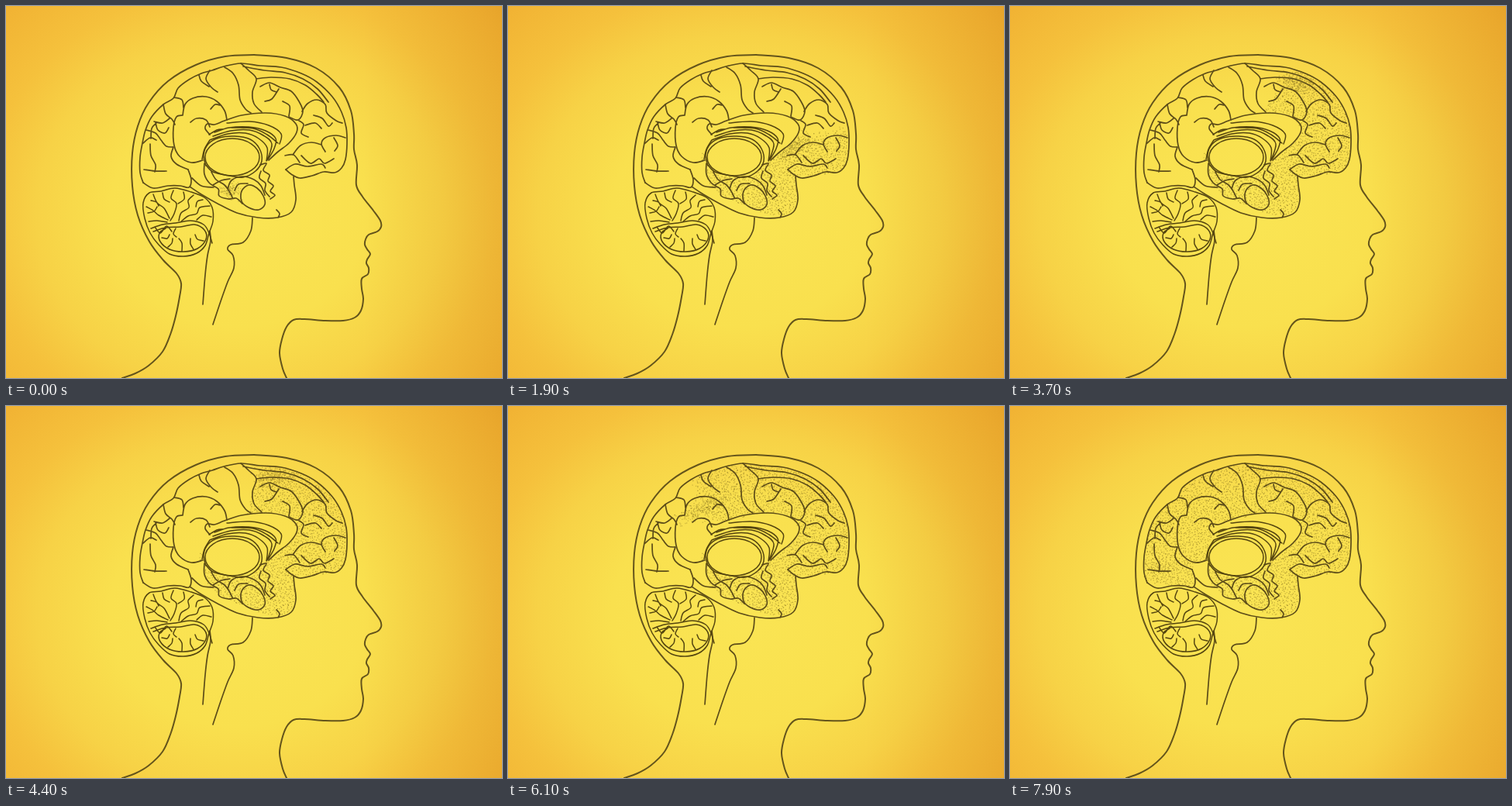
These frames come from a looping animation (640 by 480 pixels, 8000 ms). An HTML page with a canvas:

```html
<!DOCTYPE html>
<html lang="en">
<head>
<meta charset="utf-8">
<title>Brain</title>
<style>
html, body { margin: 0; width: 100%; height: 100%; overflow: hidden; background: #f5c43d; }
canvas { display: block; width: 640px; height: 480px; }
</style>
</head>
<body>
<canvas id="stage" width="640" height="480"></canvas>
<script>
const W = 640, H = 480, LOOP = 8000, STEP = 100;
const ctx = document.getElementById('stage').getContext('2d');

function randomFrom(seed) {
  return () => {
    seed = (seed + 0x6D2B79F5) | 0;
    let v = Math.imul(seed ^ (seed >>> 15), 1 | seed);
    v = (v + Math.imul(v ^ (v >>> 7), 61 | v)) ^ v;
    return ((v ^ (v >>> 14)) >>> 0) / 4294967296;
  };
}

// Smooth curve through the points of "x y x y ..."
function curve(text, closed = false, path = new Path2D()) {
  const n = text.trim().split(/\s+/).map(Number);
  const pts = [];
  for (let i = 0; i < n.length; i += 2) pts.push([n[i], n[i + 1]]);
  const count = pts.length;
  const at = i => closed ? pts[(i + count) % count] : pts[Math.max(0, Math.min(count - 1, i))];
  path.moveTo(...pts[0]);
  for (let i = 0; i < (closed ? count : count - 1); i++) {
    const [a, b, c, d] = [at(i - 1), at(i), at(i + 1), at(i + 2)];
    path.bezierCurveTo(
      b[0] + (c[0] - a[0]) / 6, b[1] + (c[1] - a[1]) / 6,
      c[0] - (d[0] - b[0]) / 6, c[1] - (d[1] - b[1]) / 6, c[0], c[1]);
  }
  return path;
}

function curves(...texts) {
  const path = new Path2D();
  texts.forEach(text => curve(text, false, path));
  return path;
}

const headBack = curve(`150 480 167 474 184 464 202 446 212 424 219 400 224 375 226 358 220 345
  203 328 185 304 170 270 163 232 163 190 170 155 184 125 209 97 245 76 283 65 320 63`);
const headFace = curve(`320 63 362 67 400 80 430 105 445 135 449 165 449 185 453 205 452 231 460 246
  474 264 483 277 484 285 479 291 468 295 464 301 463 308 466 314 470 320 466 327 465 332
  468 338 467 346 459 352 459 365 461 378 458 393 450 402 435 406 412 406 385 404 371 405
  362 414 356 430 353 448 357 468 362 480`);

const cortexTop = curve(`177 228 173 215 173 195 176 177 180 160 188 143 203 127 216 119 222 106
  236 95 252 87 266 83 281 78 303 74 328 77 355 79 381 87 401 98 421 117 433 137 439 157
  440 178 438 198 433 209 424 215 410 214 395 219 379 222 368 217 361 211`);
const cortexBase = curves(
  '177 228 190 235 209 232 225 232 236 234 239 224 235 211',
  '237 233 252 243 273 255 298 267 325 273 350 273 368 266 374 250 372 231 371 220',
  '349 263 353 268 351 273', '240 222 252 232 268 234');

const parietalFolds = curves(
  '263 83 258 94 265 105 273 111', '249 89 252 97 262 104',
  '282 79 293 87 300 102 302 121 309 133 316 138',
  '228 141 231 127 241 119 258 117 272 123 282 135 285 147',
  '217 118 227 121 229 131', '228 141 220 143 216 157 217 180 224 194 239 202 254 199',
  '238 150 246 145 258 147 263 156', '264 133 270 127 276 128',
  '203 127 206 139 214 146 218 153', '191 149 202 151 211 145');
const occipitalFolds = curves(
  '177 177 186 170 194 173', '181 160 193 164 200 173 207 181 216 182',
  '193 150 196 160 205 164 210 157', '186 178 187 193 193 205 192 214',
  '178 211 192 213 207 213', '216 182 213 194 220 204 235 211',
  '187 171 188 158 194 151');
const frontalFolds = curves(
  '303 74 313 83 323 94 318 111 320 126 330 137',
  '306 78 333 83 360 86 383 94 402 107 416 124',
  '323 94 342 92 366 94 386 102 401 114 410 124',
  '328 104 340 99 354 105 368 110 378 123 383 136 377 147 365 143',
  '334 123 343 120 352 107', '357 123 366 129 365 142', '340 101 342 108 349 111');
const prefrontalFolds = curves(
  '382 136 389 126 401 121 412 127 414 138 426 148 434 151',
  '397 141 408 145 416 155 421 151', '378 148 384 153 381 164 390 169',
  '386 154 399 151 407 158', '438 170 426 167 412 170 407 178 412 188',
  '370 192 380 180 394 176 407 179', '381 193 393 203 404 197 411 203 423 197',
  '361 211 373 204 389 207 407 204 412 209', '423 170 428 180 424 187',
  '360 193 371 192 379 202');

const callosum = curve(`263 166 257 158 260 152 269 153 282 148 304 141 335 138 360 142 374 152
  375 163 365 177 351 188 339 199`);
const fornix = curves(
  '269 163 288 157 313 156 335 161 348 171 346 184 338 198',
  '267 168 290 161 314 160 332 167 343 178 337 199',
  '263 173 286 165 309 164 326 171 337 183 336 200',
  '291 157 319 158 337 166 351 177', '285 151 314 149 339 154 355 165 353 178',
  '262 166 272 160 280 159', '263 173 256 185 253 198');
const thalamus = new Path2D();
thalamus.ellipse(292, 195, 35, 24, 0, 0, Math.PI * 2);
const thalamusRim = curve('258 206 255 192 261 178 275 170 295 168 315 172 327 184 330 200 322 213 306 221 288 219 267 214 257 204');

const limbic = curves(
  '256 203 256 217 263 229 274 236 275 245 287 249 297 248 305 255',
  '265 214 271 224 282 231 288 239 292 247',
  '286 236 291 225 305 220 320 224 329 232 334 244',
  '295 238 300 230 312 229', '328 205 336 203 332 212 340 218 338 226 345 232 341 239 347 244 341 249',
  '329 213 327 222 335 229 334 238 340 246', '267 231 278 225 289 223');
const amygdala = curve('304 239 313 231 324 235 332 245 334 256 326 263 313 260 304 252', true);

const cerebellum = curve(`200 239 218 235 239 240 256 247 266 260 267 278 262 293 257 309 246 319
  229 323 211 320 197 308 186 293 179 274 177 254 185 241`, true);
const foliaTop = curves(
  '190 243 195 254 204 261 211 274', '181 259 190 264 197 270 209 276',
  '184 278 195 277 208 279', '216 238 213 248 220 255 217 268 212 277',
  '242 244 235 251 236 260 226 267 223 277', '263 258 250 260 246 268 235 271 226 278',
  '202 241 204 249 211 253', '229 240 230 249 222 255', '254 250 247 252 245 259',
  '265 272 254 270 246 276', '187 251 194 253 197 258', '183 267 191 265 195 259');
const foliaLow = curves(
  '187 287 202 282 219 280 238 277 255 282 262 293 266 306',
  '190 291 206 286 225 285 243 282 256 289 258 301 247 313 229 317 211 314 199 304 198 293 206 287',
  '201 299 208 300 211 295', '209 311 214 306 215 300', '227 316 227 306 223 300',
  '242 314 238 307 238 300', '255 303 247 301 244 295', '219 287 216 294 220 298',
  '192 285 199 293 207 284 214 291');
const stem = curves(
  '263 290 264 303 260 322 257 347 254 385',
  '318 273 316 290 306 305 290 308 286 314 293 322 294 338 286 356 277 381 267 411');

const shade = curve(`177 227 173 210 174 185 180 160 190 141 206 126 224 106 252 88 281 79 303 75
  355 80 400 98 432 136 439 165 437 199 425 214 395 218 372 221 373 248 367 264 349 271
  327 266 305 258 276 245 258 226 257 207 267 215 290 220 315 219 329 205 340 199 365 178
  375 160 360 142 325 139 282 149 260 152 263 167 255 184 252 198 236 209 238 226 230 232 208 231`, true);

// Value of row [time, ...values] at time t
function keyed(rows, t) {
  const last = rows.length - 1;
  let i = 0;
  while (i < last - 1 && rows[i + 1][0] < t) i++;
  const a = rows[i], b = rows[i + 1];
  const k = Math.min(1, Math.max(0, (t - a[0]) / (b[0] - a[0])));
  return a.slice(1).map((v, j) => v + (b[j + 1] - v) * k);
}

// Sweep of the shading: [turned degrees, time]
const sweep = [[0, 100], [112, 1900], [140, 3000], [170, 4400], [195, 5400], [240, 6700], [310, 7800]];
// Spray brush: [time, x, y, tilt in degrees, half length, strength]
const spray = [
  [0, 289, 240, 15, 17, 0.45], [500, 307, 246, 20, 17, 0.8], [1100, 350, 244, -60, 20, 0.8],
  [1900, 369, 181, -31, 27, 1], [2400, 408, 158, -70, 24, 1], [3000, 396, 106, 34, 25, 1],
  [4400, 346, 92, -5, 28, 0.8], [5400, 277, 122, -12, 45, 1],
  [6700, 228, 142, -42, 29, 1], [7400, 199, 188, -70, 24, 0.8], [7900, 198, 210, 0, 20, 0.25]];

function revealTime(x, y) {
  const angle = Math.atan2(y - 190, x - 290) * 180 / Math.PI;
  if (angle > 100 && x > 250) return (angle - 95) * 16;
  const turned = (100 - angle + 360) % 360;
  return keyed(sweep, turned)[0];
}

function makeDots() {
  const random = randomFrom(11), dots = [], gap = 3;
  for (let y = 74; y < 274; y += gap) {
    for (let x = 172; x < 442; x += gap) {
      const px = x + random() * gap, py = y + random() * gap;
      const late = (random() - 0.5) * 200, alpha = 0.22 + random() * 0.4;
      if (ctx.isPointInPath(shade, px, py)) {
        dots.push({ x: px, y: py, alpha, time: revealTime(px, py) + late });
      }
    }
  }
  return dots;
}
const dots = makeDots();

function drawBackground() {
  ctx.save();
  ctx.translate(300, 268);
  ctx.scale(340, 300);
  const glow = ctx.createRadialGradient(0, 0, 0, 0, 0, 1.4);
  [[0, '#fae554'], [0.35, '#f9e04e'], [0.55, '#f7d246'], [0.7, '#f5c13c'], [0.9, '#f1b233'], [1, '#eba92d']]
    .forEach(([at, color]) => glow.addColorStop(at, color));
  ctx.fillStyle = glow;
  ctx.fillRect(-2, -2, 4, 4);
  ctx.restore();
  const side = ctx.createLinearGradient(460, 0, W, 0);
  side.addColorStop(0, 'rgba(190,110,10,0)');
  side.addColorStop(1, 'rgba(190,110,10,0.14)');
  ctx.fillStyle = side;
  ctx.fillRect(460, 0, W - 460, H);
}

function drawDot(x, y, alpha, size) {
  ctx.globalAlpha = alpha;
  ctx.fillRect(x - size / 2, y - size / 2, size, size);
}

function drawShading(t) {
  ctx.save();
  ctx.fillStyle = '#75611c';
  for (const dot of dots) if (dot.time <= t) drawDot(dot.x, dot.y, dot.alpha, 1.25);

  const [x, y, tilt, reach, strength] = keyed(spray, t);
  const random = randomFrom(t + 5), turn = tilt * Math.PI / 180;
  ctx.clip(shade);
  for (let i = 0; i < 260 * strength; i++) {
    const along = (random() + random() - 1) * reach * 1.15;
    const across = (random() + random() + random() - 1.5) * 12;
    drawDot(x + along * Math.cos(turn) - across * Math.sin(turn),
      y + along * Math.sin(turn) + across * Math.cos(turn), 0.32, 1.3);
  }
  ctx.restore();
}

function drawLines(color, width, paths) {
  ctx.strokeStyle = color;
  ctx.lineWidth = width;
  paths.forEach(path => ctx.stroke(path));
}

function draw(t) {
  drawBackground();
  drawShading(t);
  ctx.lineCap = ctx.lineJoin = 'round';
  drawLines('#64541b', 2, [headBack, headFace]);
  drawLines('#5c4c18', 1.7, [cortexTop, cortexBase, stem, parietalFolds, occipitalFolds,
    frontalFolds, prefrontalFolds, callosum, limbic, amygdala]);
  drawLines('#54450f', 1.5, [fornix, thalamus, thalamusRim, cerebellum, foliaTop, foliaLow]);
}

function tick(now) {
  draw(Math.floor((now % LOOP) / STEP) * STEP);
  requestAnimationFrame(tick);
}
draw(0);
requestAnimationFrame(tick);
</script>
</body>
</html>
```
